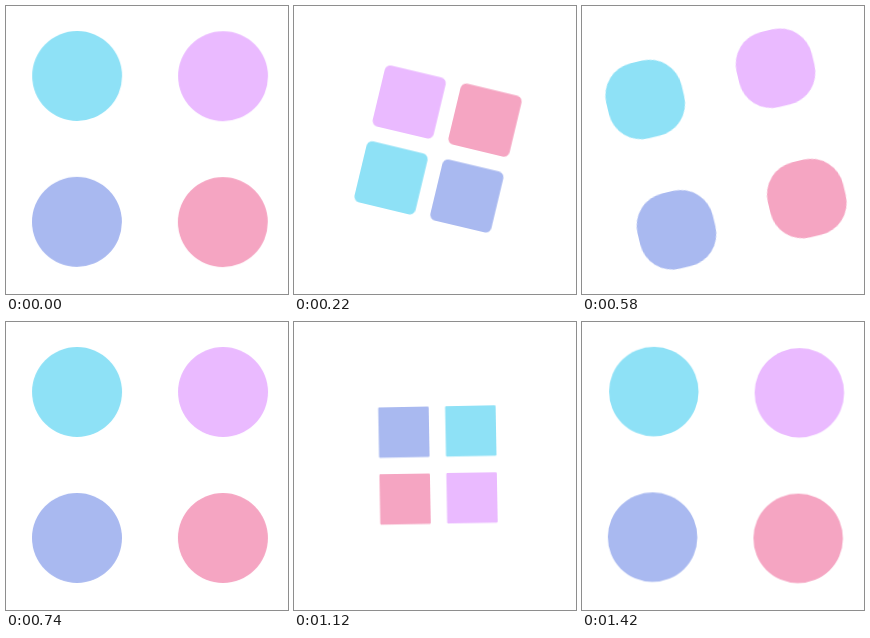
Animation of 282x288 px, one loop 1440 ms. Source, as an HTML page without scripts:

```html
<!DOCTYPE html>
<html lang="en">
<head>
<meta charset="utf-8">
<title>Four dots loader</title>
<style>
  :root {
    --swing: cubic-bezier(.4, 0, .2, 1);
    --pulse: cubic-bezier(.4, 0, .5, 1);
    --lead: -1424ms;
  }

  html, body {
    margin: 0;
    width: 100%;
    height: 100%;
    overflow: hidden;
    background: #fff;
  }

  .loader {
    position: absolute;
    left: 144px;
    top: 143px;
    width: 0;
    height: 0;
    animation: swing 1440ms var(--swing) var(--lead) infinite;
  }

  .dot {
    position: absolute;
    left: -45px;
    top: -45px;
    width: 90px;
    height: 90px;
    background: var(--color);
    animation:
      gather 720ms var(--swing) var(--lead) infinite,
      square 720ms var(--swing) var(--lead) infinite,
      shrink 720ms var(--pulse) var(--lead) infinite;
  }

  .cyan   { --x: -1; --y: -1; --color: #8ee1f6; }
  .violet { --x: 1;  --y: -1; --color: #eabaff; }
  .blue   { --x: -1; --y: 1;  --color: #a9b9f0; }
  .pink   { --x: 1;  --y: 1;  --color: #f5a5c2; }

  @keyframes swing {
    0%, 50%, 100% { transform: rotate(0deg); }
    25% { transform: rotate(-90deg); }
    75% { transform: rotate(90deg); }
  }

  @keyframes gather {
    0%, 100% { translate: calc(var(--x) * 73px) calc(var(--y) * 73px); }
    50% { translate: calc(var(--x) * 33px) calc(var(--y) * 33px); }
  }

  @keyframes square {
    0%, 100% { border-radius: 50%; }
    50% { border-radius: 2%; }
  }

  @keyframes shrink {
    0%, 100% { scale: 1; }
    50% { scale: .5556; }
  }
</style>
</head>
<body>
  <div class="loader">
    <div class="dot cyan"></div>
    <div class="dot violet"></div>
    <div class="dot blue"></div>
    <div class="dot pink"></div>
  </div>
</body>
</html>
```
